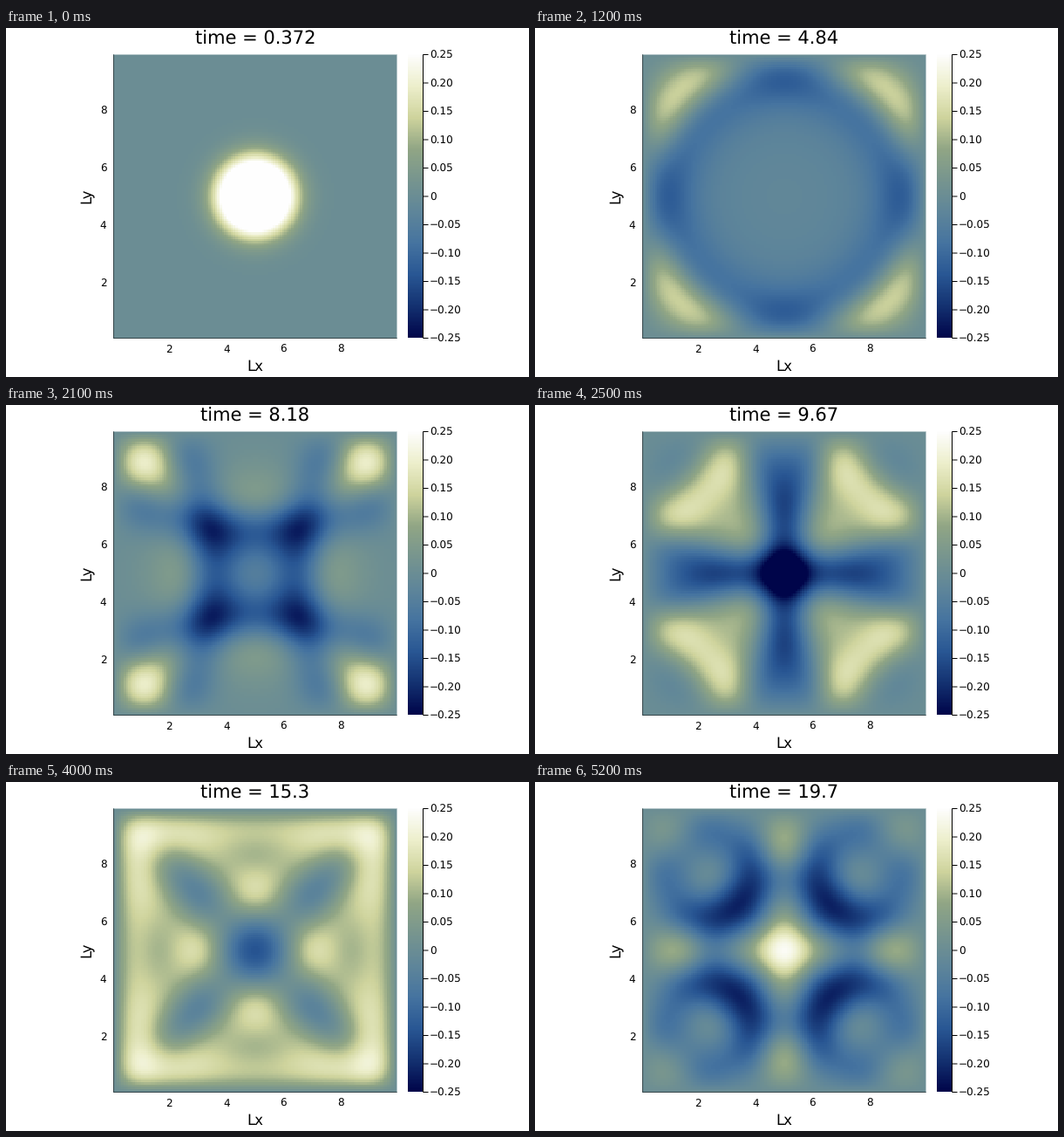
These frames come from a looping animation (600x400 px, 5.3 s). A matplotlib script:

```python
import numpy as np
import matplotlib.pyplot as plt
from matplotlib.animation import FuncAnimation
from matplotlib.colors import LinearSegmentedColormap

plt.rcParams["font.family"] = "DejaVu Sans"
plt.rcParams["text.hinting"] = "none"

W, H, DPI = 600, 400, 100
FRAMES, INTERVAL = 53, 100

# Acoustic wave on a staggered grid, pressure fixed at the border
SIZE, N, STEPS = 10.0, 128, 10
DX = SIZE / N
DT = DX / 2.1
LO, HI = DX / 2, SIZE - DX / 2
VMAX = 0.25

# Plot area and colour bar in stage pixels, y pointing down
LEFT, RIGHT, TOP, BOTTOM = 123.5, 448.5, 30.5, 355.5
SIDE = RIGHT - LEFT
BAR_LEFT, BAR_RIGHT = 461, 478.5
MID_X, MID_Y = (LEFT + RIGHT) / 2, (TOP + BOTTOM) / 2
TICK, LABEL, TITLE = 12, 16.5, 21

STOPS = [(0, 5, 74), (20, 50, 113), (41, 87, 148), (70, 116, 160),
         (95, 134, 154), (119, 149, 143), (145, 166, 133),
         (207, 212, 157), (237, 239, 204), (254, 254, 254)]
CMAP = LinearSegmentedColormap.from_list(
    "sea", [tuple(c / 255 for c in rgb) for rgb in STOPS], N=256)


def simulate():
    """Return the pressure field for every frame."""
    x = np.linspace(LO, HI, N) - SIZE / 2
    p = np.exp(-x[:, None] ** 2 - x[None, :] ** 2)
    vx = np.zeros((N, N - 1))
    vy = np.zeros((N - 1, N))
    k = DT / DX
    fields = []
    for _ in range(FRAMES):
        for _ in range(STEPS):
            vx -= k * np.diff(p, axis=1)
            vy -= k * np.diff(p, axis=0)
            p[1:-1, 1:-1] -= k * (np.diff(vx[1:-1], axis=1)
                                  + np.diff(vy[:, 1:-1], axis=0))
        fields.append(p.copy())
    return fields


def title_text(i):
    t = (i + 1) * STEPS * DT
    return f"time = {float(f'{t:.3g}')}"


fields = simulate()

fig = plt.figure(figsize=(W / DPI, H / DPI), dpi=DPI, facecolor="white")

# The field fills whole pixels; its half-covered rim is softened below
PAD = 0.5
field_ax = fig.add_axes([(LEFT - PAD) / W, 1 - (BOTTOM + PAD) / H,
                         (SIDE + 2 * PAD) / W, (SIDE + 2 * PAD) / H])
field_ax.axis("off")
image = field_ax.imshow(fields[0], cmap=CMAP, vmin=-VMAX, vmax=VMAX,
                        origin="lower", extent=(0, SIZE, 0, SIZE),
                        interpolation="nearest", aspect="auto")
margin = PAD * (HI - LO) / SIDE
field_ax.set_xlim(LO - margin, HI + margin)
field_ax.set_ylim(LO - margin, HI + margin)

stage = fig.add_axes([0, 0, 1, 1])
stage.axis("off")
stage.imshow(np.linspace(1, 0, 256)[:, None], cmap=CMAP, vmin=0, vmax=1,
             extent=(BAR_LEFT, BAR_RIGHT, BOTTOM, TOP),
             interpolation="nearest", aspect="auto")
stage.set_xlim(0, W)
stage.set_ylim(H, 0)


def line(x0, y0, x1, y1, color="black", alpha=1):
    stage.plot([x0, x1], [y0, y1], color=color, alpha=alpha, lw=0.72,
               solid_capstyle="butt", snap=False)


def text(x, y, s, px, ha="center", **kw):
    return stage.text(x, y, s, fontsize=px * 72 / DPI, ha=ha,
                      va="baseline", color="black", **kw)


line(LEFT, TOP, RIGHT + PAD, TOP, "white", 0.5)
line(RIGHT, TOP, RIGHT, BOTTOM, "white", 0.5)
line(LEFT, TOP, LEFT, BOTTOM, alpha=0.5)
line(LEFT, BOTTOM, RIGHT, BOTTOM, alpha=0.5)
line(BAR_RIGHT, TOP, BAR_RIGHT, BOTTOM)

HALF_DIGIT = 0.365 * TICK
for v in (2, 4, 6, 8):
    shift = (v - LO) / (HI - LO) * SIDE
    text(LEFT + shift - 0.5, 372, str(v), TICK)
    text(115.5, BOTTOM - shift + HALF_DIGIT, str(v), TICK, ha="right")

for n in range(-5, 6):
    y = MID_Y - n / 10 * SIDE
    s = f"{n * 0.05:.2f}".replace("-", "\u2212") if n else "0"
    line(BAR_RIGHT, y, 484.5, y)
    text(485.8, y + HALF_DIGIT, s, TICK, ha="left")

text(MID_X, 392.6, "Lx", LABEL)
text(96.6, MID_Y - 1, "Ly", LABEL, rotation=90, rotation_mode="anchor")
title = text(MID_X, 18.6, title_text(0), TITLE)


def draw(i):
    image.set_data(fields[i])
    title.set_text(title_text(i))
    return image, title


anim = FuncAnimation(fig, draw, frames=FRAMES, interval=INTERVAL,
                     repeat=True, repeat_delay=0, blit=False)
plt.show()
```
